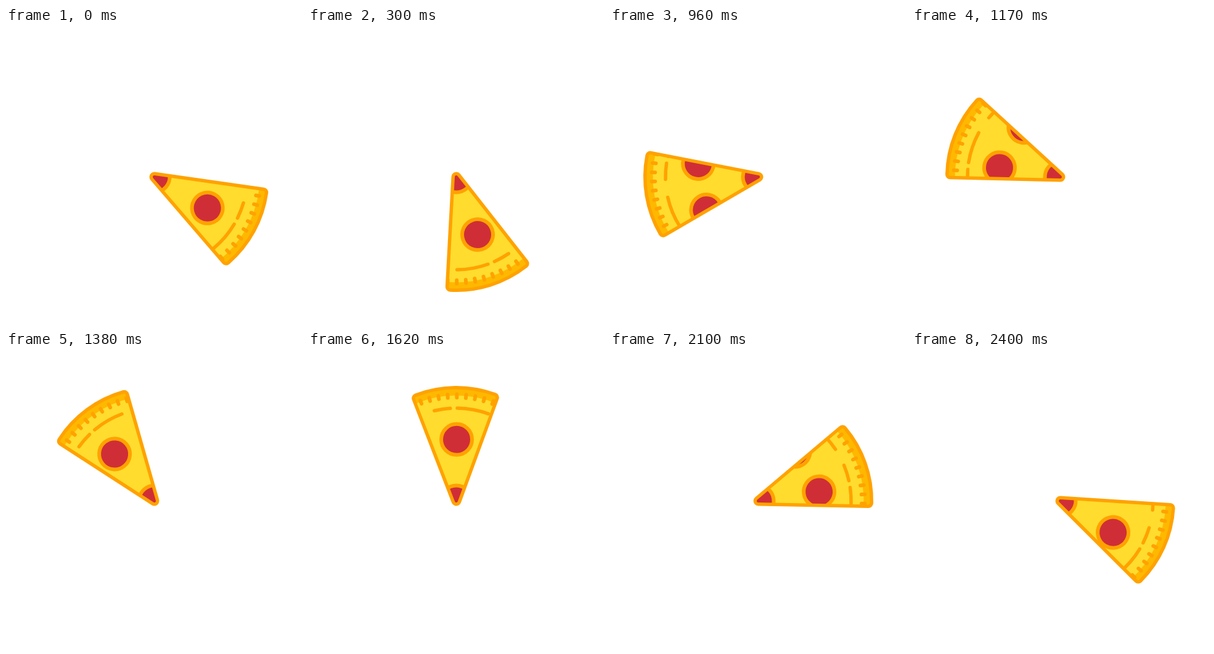
Animation of 480 by 480 pixels, one loop 2.43 s. Source, as an HTML page:

```html
<!DOCTYPE html>
<html lang="en">
<head>
<meta charset="utf-8">
<title>Pizza slice</title>
<style>
  html, body { margin: 0; width: 100%; height: 100%; overflow: hidden; background: #fff; }
  svg { display: block; width: 100%; height: 100%; }
  .line { fill: none; stroke: #ffa200; stroke-linecap: round; }
  .cut { stroke-linejoin: round; }
</style>
</head>
<body>
<svg viewBox="0 0 480 480">
  <defs>
    <mask id="window" maskUnits="userSpaceOnUse" x="-240" y="-240" width="480" height="480">
      <path class="cut" fill="#fff" stroke="#fff" stroke-width="5"/>
    </mask>
  </defs>
  <g transform="translate(240.5 241.5)">
    <path class="cut" fill="#ffa200" stroke="#ffa200" stroke-width="16"/>
    <g mask="url(#window)"><g id="pizza"></g></g>
  </g>
</svg>
<script>
const LOOP = 2430, STEP = 30;
const PARTS = 8, PART = 360 / PARTS;
const HALF = 20.6, RADIUS = 178.5;
const pizza = document.getElementById('pizza');
const cuts = document.querySelectorAll('.cut');

function polar(r, deg) {
  const a = deg * Math.PI / 180;
  return [r * Math.cos(a), r * Math.sin(a)].map(v => v.toFixed(2));
}

function arc(r, from, to) {
  return `M${polar(r, from)}A${r} ${r} 0 0 1 ${polar(r, to)}`;
}

function add(tag, attrs) {
  const el = document.createElementNS('http://www.w3.org/2000/svg', tag);
  for (const key in attrs) el.setAttribute(key, attrs[key]);
  pizza.append(el);
}

function line(d, width) {
  add('path', { class: 'line', d, 'stroke-width': width });
}

function pepperoni(r, deg) {
  const [cx, cy] = polar(r, deg);
  add('circle', { cx, cy, r: 25, fill: '#cf2e37', stroke: '#ffa200', 'stroke-width': 6 });
}

add('circle', { r: 190, fill: '#ffb800' });
add('circle', { r: 171, fill: '#ffdc2e' });

for (let a = 0; a < 360; a += 5) line(`M${polar(167.5, a)}L${polar(173, a)}`, 6);

for (let a = 0; a < 360; a += PART) {
  line(arc(150.5, a - 14, a - 4), 5.5);
  line(arc(150.5, a + 0.3, a + 19.8), 5.5);
  pepperoni(99.7, a);
}
pepperoni(0, 0);

const sector = arc(RADIUS, -HALF, HALF) + 'L0 0Z';
cuts.forEach(el => el.setAttribute('d', sector));

function turn(el, deg) {
  el.setAttribute('transform', `rotate(${deg.toFixed(3)})`);
}

// The window makes one full turn while the pizza turns back by one part
function draw(ms) {
  const p = Math.floor(ms % LOOP / STEP) * STEP / LOOP;
  const angle = 28.7 + 360 * p - 0.9 * Math.sin(2 * Math.PI * p);
  cuts.forEach(el => turn(el, angle));
  turn(pizza, 30.3 - PART * p);
}

const begin = performance.now();
function tick() {
  draw(performance.now() - begin);
  requestAnimationFrame(tick);
}
tick();
</script>
</body>
</html>
```
